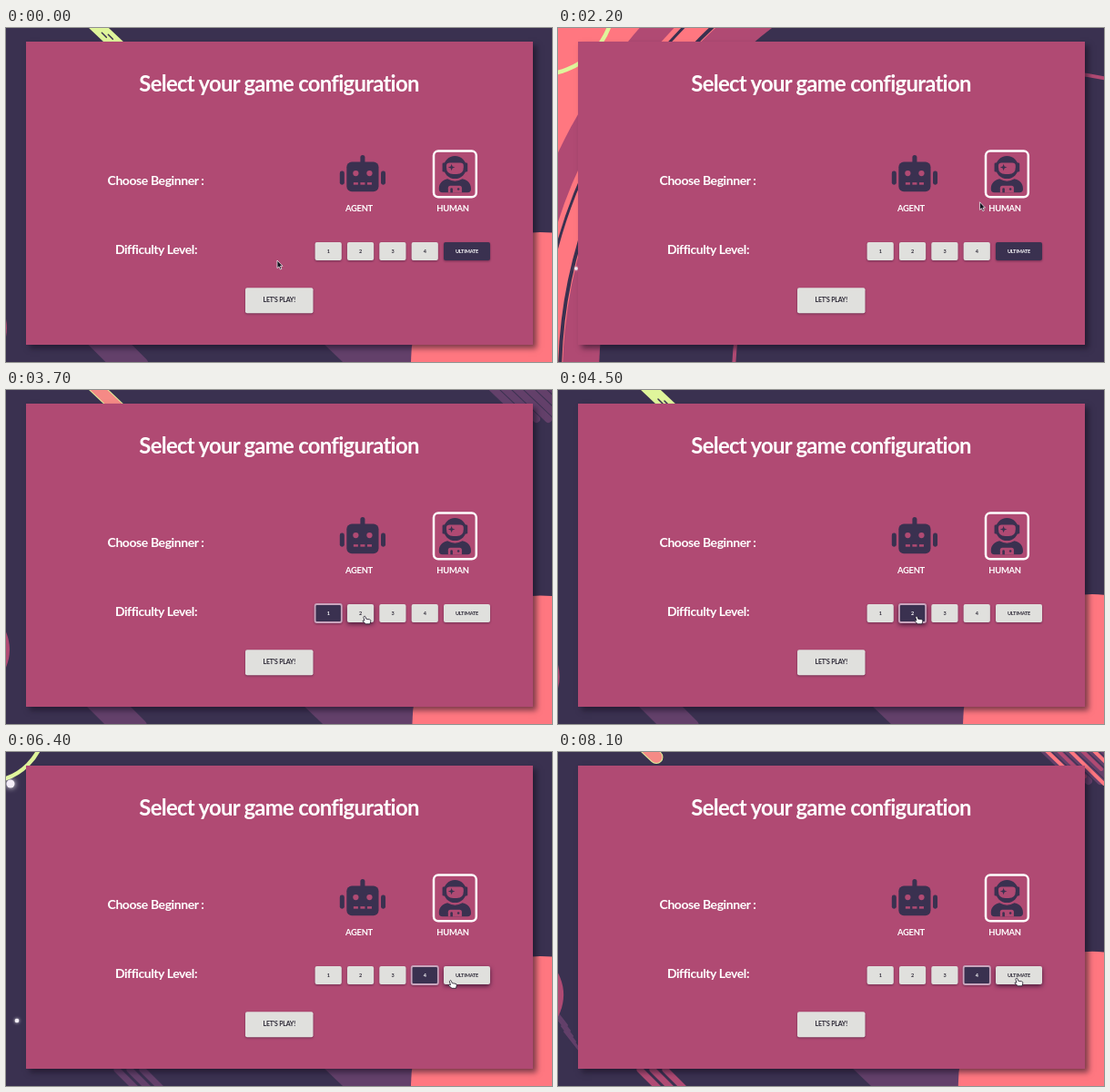
An HTML page with a canvas that plays this animation: 600x368 px, repeating every 8200 ms.

```html
<!DOCTYPE html>
<html lang="en">
<head>
<meta charset="utf-8">
<title>Game configuration</title>
<style>
html, body { margin: 0; width: 100%; height: 100%; overflow: hidden; background: #3a3150; }
canvas, svg { position: absolute; left: 0; top: 0; width: 600px; height: 368px; }
.panel { position: absolute; left: 22px; top: 15px; width: 557px; height: 334px;
  background: #b04a73; box-shadow: 4px 4px 6px rgba(20, 12, 30, .55); }
text { font-family: Lato, "Open Sans", sans-serif; font-weight: 700; letter-spacing: -.03em;
  text-anchor: middle; fill: #fff; }
.title { font-size: 23.9px; }
.label { font-size: 14px; }
.name { font-size: 9.4px; }
.btn rect { fill: #e0e0dd; filter: drop-shadow(0 1px 1px rgba(40, 10, 40, .45)); }
.btn text { fill: #2b2735; font-size: 5.5px; }
.btn.play text { font-size: 7px; }
.btn.hover rect { filter: drop-shadow(0 2px 2.5px rgba(30, 5, 35, .7)); }
.btn.on rect { fill: #3a3150; }
.btn.on text { fill: #fff; }
.btn.ring rect { stroke: #c9a5bd; stroke-width: 1.8px; }
.ink { fill: #3a3150; }
.gap { fill: #b04a73; }
.frame { fill: none; stroke: #fff; stroke-width: 2.5px; }
</style>
</head>
<body>
<canvas id="sky" width="600" height="368"></canvas>
<div class="panel"></div>
<svg viewBox="0 0 600 368">
  <text class="title" x="300" y="70">Select your game configuration</text>
  <text class="label" x="164.5" y="173">Choose Beginner :</text>
  <text class="label" x="165" y="249">Difficulty Level:</text>
  <text class="name" x="388" y="202">AGENT</text>
  <text class="name" x="491" y="202">HUMAN</text>

  <g transform="translate(366.8 140) scale(.0785)">
    <g class="ink">
      <rect x="288" width="64" height="130" rx="32"/>
      <rect x="96" y="96" width="448" height="416" rx="72"/>
      <rect y="224" width="64" height="192" rx="30"/>
      <rect x="576" y="224" width="64" height="192" rx="30"/>
    </g>
    <g class="gap">
      <circle cx="224" cy="256" r="40"/><circle cx="416" cy="256" r="40"/>
      <rect x="192" y="384" width="64" height="32"/>
      <rect x="288" y="384" width="64" height="32"/>
      <rect x="384" y="384" width="64" height="32"/>
    </g>
  </g>

  <g transform="translate(475.8 141) scale(.0785)">
    <g class="ink">
      <circle cx="224" cy="160" r="160"/>
      <rect x="48" y="96" width="352" height="128" rx="16"/>
      <path d="M120 321Q224 383 328 321C395 329 448 385 448 454V464Q448 512 400 512H48Q0 512 0 464V454C0 385 53 329 120 321Z"/>
    </g>
    <path class="gap" d="M104 136Q104 96 152 96H296Q344 96 344 136V160Q344 256 248 256H200Q104 256 104 160Z"/>
    <path class="ink" d="M176 208L164 172 128 160 164 148 176 112 188 148 224 160 188 172Z"/>
    <path class="gap" d="M128 512V448Q128 416 160 416H288Q320 416 320 448V512Z"/>
    <path class="ink" d="M160 512V464a16 16 0 0 1 32 0V512Z"/>
    <circle class="ink" cx="272" cy="464" r="16"/>
  </g>

  <rect class="frame" id="agent" x="360" y="132.7" width="64.5" height="53.5" rx="5"/>
  <rect class="frame" id="human" x="470" y="135.6" width="46.8" height="50.7" rx="5"/>
  <g id="buttons"></g>

  <g id="cursor">
    <path id="arrow" d="M0 0V8.6L2 6.9 3.4 10 4.9 9.3 3.5 6.3H6Z" fill="#161320" stroke="#fff" stroke-width=".7"/>
    <path id="hand" d="M.4 .4Q1.6 -.3 2 1L2.7 3.2 6.5 3.8Q8 4.1 7.8 5.6L7 8.8H2.5L-.9 6Q-1.2 4.8 .1 4.8L1 5.2 -.1 1.4Q-.2 .8 .4 .4Z" fill="#fff" stroke="#1d1928" stroke-width=".8"/>
  </g>
</svg>
<script>
const LOOP = 8200, SCENE = 4900, SCENE_OFFSET = 2500, STEP = 100;
const DARK = '#3a3150', PINK = '#ff7780', ROSE = '#b04a73', PLUM = '#63406a', LIME = '#dff59b';
const $ = id => document.getElementById(id);
const c = $('sky').getContext('2d');

// Eased 0..1 between two times
function ramp(t, from, to) {
  const u = Math.min(1, Math.max(0, (t - from) / (to - from)));
  return u * u * (3 - 2 * u);
}

function disc(x, y, r, color) {
  c.fillStyle = color;
  c.beginPath();
  c.arc(x, y, Math.max(0, r), 0, 7);
  c.fill();
}

function ring(x, y, r, width, color) {
  if (r <= 0) return;
  c.strokeStyle = color;
  c.lineWidth = width;
  c.beginPath();
  c.arc(x, y, r, 0, 7);
  c.stroke();
}

function line(x, y, dx, dy, width, color) {
  c.strokeStyle = color;
  c.lineWidth = width;
  c.lineCap = 'round';
  c.beginPath();
  c.moveTo(x, y);
  c.lineTo(x + dx, y + dy);
  c.stroke();
}

// Rain of diagonal streaks in the corners, then broad beams below
function streaks(q) {
  const early = q < 1100;
  const slide = 60 * ramp(q, 1300, 2200);
  for (let i = 0; i < 6; i++) {
    const x = 526 + i * 13 + slide, y = -10 - slide;
    line(x, y, 44, 42, 8, PLUM);
    if (early) line(x + 6, y + 4, 26 + i % 3 * 8, 25 + i % 3 * 8, 4, i % 2 ? ROSE : PINK);
    if (early) line(-8 + i * 3, 262 + i * 6 + q * .02, 18, 23, 2, PLUM);
  }
  if (q < 500) line(0, 66, 27, -66, 1.3, PLUM);

  const x = 90 + 32 * ramp(q, 2300, 3900);
  const solid = q > 1100 && q < 3300;
  for (let i = 0; i < 3; i++)
    line(x + i * 14, solid ? 340 : 350, 30, 30, solid ? 14 : 7, early ? ROSE : PLUM);
}

function beam(q) {
  const x = 320 + 26 * ramp(q, 900, 2500);
  c.fillStyle = PLUM;
  c.beginPath();
  c.moveTo(x, 345);
  c.lineTo(480, 345);
  c.lineTo(480, 368);
  c.lineTo(x + 24, 368);
  c.fill();
}

function comet(q) {
  const tip = Math.min(34, (q - 700) * .056);
  const tail = Math.max(-12, (q - 2900) * .073 - 12);
  if (tip <= tail) return;
  const green = q > 1900, len = tip - tail;
  const x = 102 + tail * 1.06;
  line(x, tail, len * 1.06, len, 15, LIME);
  if (!green) return line(x, tail, len * 1.06, len, 13, '#f58a86');
  const s = 16 - 18 * ramp(q, 2300, 2900);
  for (let i = 0; i < 2; i++) line(94 + s + i * 7, s - 6 + i * 2, 5, 5, 1.5, DARK);
}

// Pink ball pops up, wobbles, and finally swells over the whole scene
function ball(q) {
  const wobble = .27 * Math.exp(-q / 400) * Math.cos((q - 300) * Math.PI / 500);
  disc(587, 367, 142 * ramp(q, 0, 250) * (1 - wobble) + Math.max(0, q - 4250) * 1.35, PINK);
}

// Rings that chase the ball and leave a dark sky
function rings(q) {
  const r = (q - 4400) * 1.95, x = 530, y = 385;
  if (r <= 0) return;
  disc(x, y, r, ROSE);
  disc(x, y, r - 28, PINK);
  ring(x, y, r - 35, 3, DARK);
  ring(x, y, r - 57, 4, DARK);
  disc(x, y, r - 60, ROSE);
  disc(x, y, r - 100, DARK);
  ring(x, y, r - 248, 4, ROSE);
}

// Scene time, x, y, radius
const stars = [[300, 321, 14, 1.8], [2900, 2, 347, 2.5], [4000, 5, 35, 4.5], [4000, 12, 296, 2.3], [4600, 20, 265, 1.8]];

function drawSky(q) {
  c.fillStyle = DARK;
  c.fillRect(0, 0, 600, 368);
  streaks(q);
  beam(q);
  comet(q);
  const out = 13 * Math.exp(-q / 1500) - 1.5;
  if (out > 0) disc(out - 50, 238 + q * .037, 50, ROSE);
  ball(q);
  ring(-20, -30, 85 * (1 - Math.exp((3500 - q) / 380)), 4.5, LIME);
  rings(q);
  for (const [time, x, y, r] of stars) {
    c.globalAlpha = 1 - ramp(Math.abs(q - time), 100, 350);
    c.shadowColor = '#fff';
    c.shadowBlur = r * 1.5;
    disc(x, y, r, '#f4eef8');
  }
  c.globalAlpha = 1;
  c.shadowBlur = 0;
}

const buttons = ['1', '2', '3', '4', 'ULTIMATE', "LET'S PLAY!"].map((label, i) => {
  const play = i === 5;
  const x = play ? 263 : 339.6 + i * 35.35, y = play ? 286.2 : 236;
  const w = play ? 74.5 : i === 4 ? 51 : 29.2, h = play ? 28 : 20;
  const g = document.createElementNS('http://www.w3.org/2000/svg', 'g');
  g.innerHTML = `<rect x="${x}" y="${y}" width="${w}" height="${h}" rx="2"/>` +
    `<text x="${x + w / 2}" y="${y + h / 2 + 2.1}">${label}</text>`;
  $('buttons').append(g);
  return { g, x, y, w, h, play };
});

// Pointer moves: start, end, x, y
const moves = [
  [100, 800, 390, 168], [1150, 1700, 503, 162], [1900, 2700, 378, 256], [2700, 2950, 354, 250],
  [3250, 3700, 393, 249], [4600, 5300, 472, 254], [6100, 6700, 503, 249]
];

function drawMenu(t) {
  let x = 298, y = 256;
  for (const [from, to, toX, toY] of moves) {
    const u = ramp(t, from, to);
    x += (toX - x) * u;
    y += (toY - y) * u;
  }
  const agent = t >= 900 && t < 1800;
  const active = t < 3100 ? 4 : t < 4100 ? 0 : t < 5700 ? 1 : 3;
  let over = false;
  buttons.forEach((b, i) => {
    const hover = x >= b.x && x <= b.x + b.w && y >= b.y && y <= b.y + b.h;
    const on = i === active;
    over = over || hover;
    b.g.setAttribute('class', ['btn', b.play && 'play', hover && 'hover', on && 'on', on && i < 4 && 'ring']
      .filter(Boolean).join(' '));
  });
  const show = (id, yes) => { $(id).style.display = yes ? '' : 'none'; };
  show('agent', agent);
  show('human', !agent);
  show('arrow', !over);
  show('hand', over);
  $('cursor').setAttribute('transform', `translate(${x} ${y})`);
}

const start = performance.now();
function tick(now) {
  const t = Math.floor((Math.max(0, now - start) % LOOP) / STEP) * STEP;
  drawSky((t + SCENE_OFFSET) % SCENE);
  drawMenu(t);
  requestAnimationFrame(tick);
}
tick(start);
</script>
</body>
</html>
```
